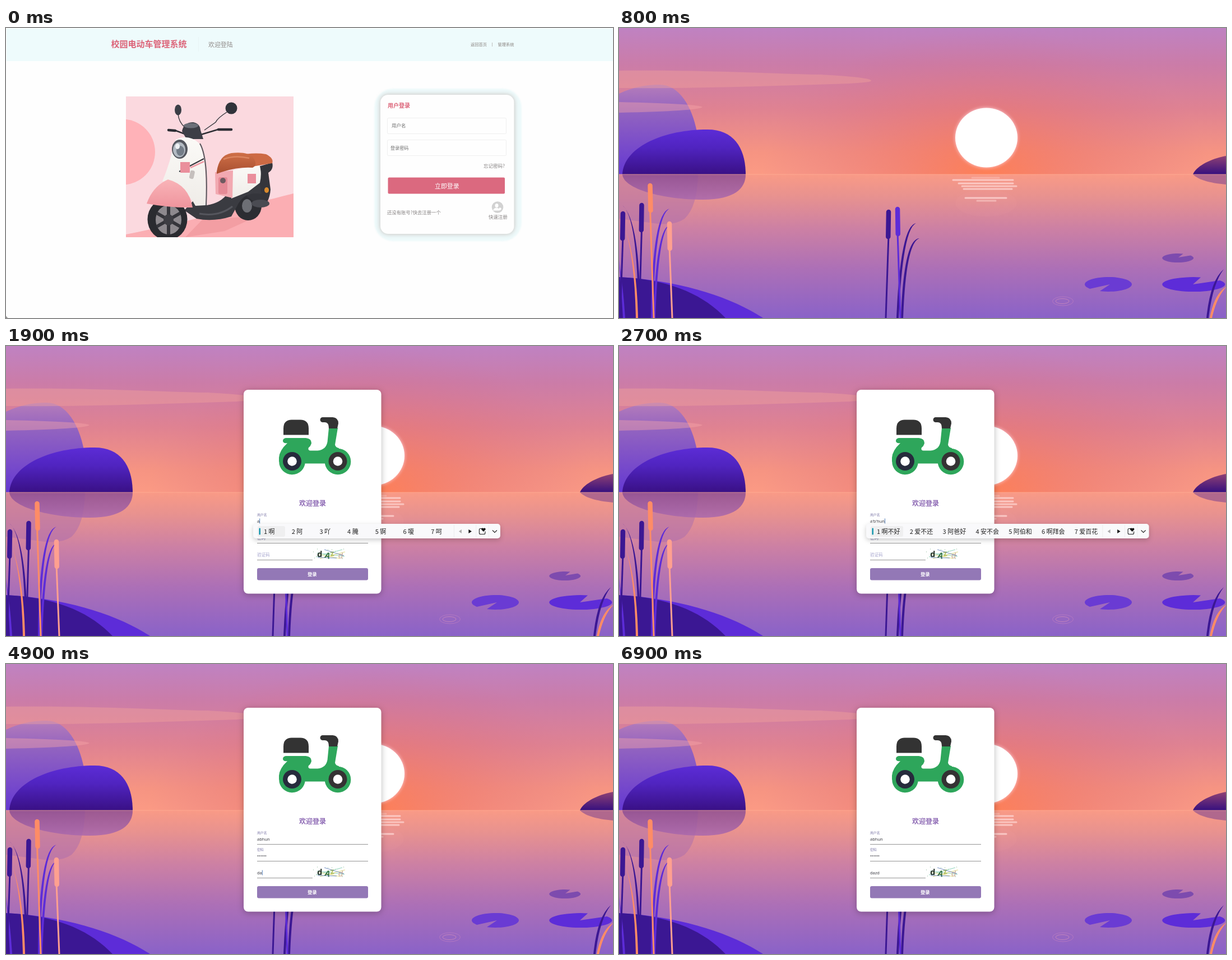
Write an HTML page that moves like this. It is 1083x517 px and loops after 8000 ms.

```html
<!DOCTYPE html>
<html lang="zh-CN">
<head>
<meta charset="utf-8">
<style>
html, body { margin: 0; width: 100%; height: 100%; overflow: hidden; background: #fefefe }
svg { display: block; width: 1083px; height: 517px; font-family: "Noto Sans CJK SC", "Noto Sans", sans-serif }
text { white-space: pre }
.value { font: 7.5px "Noto Sans", "Open Sans", sans-serif; fill: #3c3c44 }
.sun { filter: drop-shadow(0 0 3px #ffd0d8) }
.ring { filter: blur(1px) }
.soft { filter: drop-shadow(0 0 4px #9a7f7880) }
.card { filter: drop-shadow(0 2px 6px #0004) }
.panel { filter: drop-shadow(0 3px 4px #0003) }
</style>
</head>
<body>
<svg id="stage" viewBox="0 0 1083 517"></svg>
<script>
const LOOP = 8000;
const stage = document.getElementById("stage");
const $ = id => document.getElementById(id);

// Text placed by its left edge and vertical centre.
const label = (s, x, cy, size, fill, extra = "") =>
  `<text x="${x}" y="${cy + size * 0.38}" font-size="${size}" fill="${fill}" ${extra}>${s}</text>`;
const box = (x, y, w, h, fill, r = 0, extra = "") =>
  `<rect x="${x}" y="${y}" width="${w}" height="${h}" rx="${r}" fill="${fill}" ${extra}/>`;
const oval = (x, y, rx, ry, fill, extra = "") =>
  `<ellipse cx="${x}" cy="${y}" rx="${rx}" ry="${ry}" fill="${fill}" ${extra}/>`;
const shape = (d, fill, extra = "") => `<path d="${d}" fill="${fill}" ${extra}/>`;
const line = (d, color, w = 1, extra = "") =>
  `<path d="${d}" fill="none" stroke="${color}" stroke-width="${w}" ${extra}/>`;
const round = 'stroke-linecap="round"';
const bold = 'font-weight="700"';
const fade = (id, ...stops) => `<linearGradient id="${id}" x2="0" y2="1">${stops.map(([o, c]) =>
  `<stop offset="${o}" stop-color="${c}"/>`).join("")}</linearGradient>`;

const defs = `<defs>
  ${fade("sky", [0, "#bf82c2"], [.25, "#cb7ca8"], [.55, "#df8292"], [.85, "#f69482"], [1, "#fb9a84"])}
  ${fade("water", [0, "#f99a86"], [.15, "#e8928f"], [.38, "#cc80a4"], [.65, "#ad70b6"], [1, "#8a62c8"])}
  ${fade("backHill", [0, "#b57cba"], [.3, "#9263c0"], [1, "#6438d2"])}
  ${fade("frontHill", [0, "#5c2cd6"], [.4, "#5024c0"], [1, "#391085"])}
  ${fade("mirror", [0, "#8c4d92"], [1, "#a968ae"])}
  ${fade("farHill", [0, "#8f4174"], [1, "#36107e"])}
  ${fade("white", [0, "#fbfaf7"], [1, "#efece8"])}
  ${fade("seat", [0, "#cf6f47"], [1, "#a84f30"])}
  ${fade("fender", [0, "#f9b4b8"], [1, "#ef949d"])}
  <radialGradient id="glow" gradientUnits="userSpaceOnUse" cx="655" cy="262" r="400" gradientTransform="matrix(1 0 0 .65 0 92)">
    <stop stop-color="#ff7c50" stop-opacity=".9"/><stop offset=".5" stop-color="#e8706c" stop-opacity=".4"/>
    <stop offset="1" stop-color="#d06c90" stop-opacity="0"/></radialGradient>
  <clipPath id="photo">${box(214, 122, 299, 251, "#000")}</clipPath>
</defs>`;

const photo = `<g clip-path="url(#photo)">
  ${box(214, 122, 299, 251, "#fbd9df")}
  ${oval(208, 221, 58, 58.5, "#ffb2b8")}
  ${shape("M214 368C330 345 420 318 513 295V373H214Z", "#fbaeb3")}
  ${shape("M320 373L350 342L450 335L390 362Z", "#e9898f", 'opacity=".45"')}
  ${line("M307 153Q308 168 320 178M394 150Q378 160 374 168L354 182", "#33343a", 1.4)}
  ${oval(307, 146, 6, 9.5, "#3b3e46")}${oval(402, 143, 10.5, 10.5, "#30333a")}
  ${line("M303 183L322 190M348 190L378 181", "#2d2e34", 2.5)}${line("M290 182L302 183M379 181L402 181", "#2d2e34", 4.5, round)}
  ${shape("M314 184Q317 168 334 168Q346 170 347 182L352 198H322Z", "#3c3e46")}
  ${oval(330, 174, 13, 4.5, "#6b6f78")}
  ${oval(432, 317, 24, 26, "#2c2d32")}${oval(430, 317, 9, 12, "#6d6f75")}
  ${shape("M440 250L475 240Q478 252 468 258L472 288Q470 312 456 320L430 300Z", "#34353b")}
  ${oval(465, 289, 4, 5, "#d98a2c")}
  ${shape("M338 304L358 316Q384 312 396 294L452 272L456 296Q425 290 412 318L402 336Q370 346 340 340L318 325Z", "#3a3b41")}
  ${line("M345 331Q380 337 404 318", "#55565d", 3)}
  ${oval(454, 313, 16, 7, "#4a4b52")}
  ${shape("M402 254L452 243Q457 258 453 276L432 292L402 304Z", "url(#white)")}
  ${shape("M373 257L405 254L404 303L374 296Z", "#f2a9b1")}
  ${box(379, 266, 16, 30, "#e58a96", 3)}${oval(387, 272, 5, 5, "#6e5a60")}
  ${box(431, 260, 15, 17, "#ea8f9c")}
  ${shape("M412 228Q440 221 464 225Q478 232 475 241L440 247Z", "#cd6a44")}
  ${shape("M376 256Q380 227 402 223Q432 220 441 231Q450 244 440 249Q410 247 376 260Z", "url(#seat)")}
  ${line("M388 234Q408 226 434 232", "#dc855f", 2.5)}
  ${oval(288, 341, 35.5, 37, "#2a2b30")}${oval(290, 342, 23, 26, "#8d898e")}
  ${line("M290 318V368M269 330L311 354M269 354L311 330", "#35353b", 6)}${oval(290, 342, 9, 10, "#3d3d43")}
  ${shape("M303 199Q325 188 344 205Q358 225 356 316L338 317Q322 285 279 273Q291 245 297 218Z", "url(#white)")}
  ${shape("M251 313Q262 282 289 270Q326 280 333 320Q292 321 251 313Z", "url(#fender)")}
  ${line("M346 206Q361 232 357 316", "#55555b", 2)}
  ${oval(310, 216, 14, 17, "#54575f")}${oval(309, 217, 11, 13.5, "#b3bac2")}${oval(311, 219, 7, 9, "#747d88")}${oval(306, 211, 4, 5, "#eef1f4")}
  ${line("M309 256L353 233", "#34343a", 2)}${line("M329 249L353 238", "#ef9ba6", 3)}
  ${box(311, 239, 17, 19, "#ea8f9c")}${box(328, 254, 8, 15, "#c5bfbd", 3, 'transform="rotate(12 332 261)"')}
</g>`;

const portal = `<g id="portal">
  ${box(0, 0, 1083, 517, "#fefefe")}${box(1, 1, 1082, 58, "#eefbfc")}
  ${label("校园电动车管理系统", 187.5, 28.5, 15, "#dc6378", bold)}
  ${box(343, 16, 1, 26, "#e9f4f5")}
  ${label("欢迎登陆", 361, 29.5, 10.9, "#8f8a88")}
  ${label("返回首页", 829, 29.5, 7.25, "#8a8480")}${box(867, 26, .7, 7, "#a9a4a2")}
  ${label("管理系统", 877.5, 29.5, 7.25, "#8a8480")}
  ${photo}
  ${box(657, 108, 263, 272, "#eefafb", 34, 'class="ring"')}
  <g class="soft">${box(668, 119, 238.5, 248, "#fefefe", 14)}</g>
  ${label("用户登录", 681, 138.5, 10, "#dc6378", bold)}
  ${box(680.5, 160.5, 212, 28, "#fefefe", 2, 'stroke="#efefef"')}${label("用户名", 688, 174, 8.5, "#6f6f6f")}
  ${box(680.5, 199.5, 212, 28, "#fefefe", 2, 'stroke="#efefef"')}${label("登录密码", 686, 213.5, 8.1, "#6f6f6f")}
  ${label("忘记密码?", 852, 245.5, 8.5, "#858080")}
  ${box(681.5, 266.5, 208.5, 29, "#db697f", 2)}${label("立即登录", 765, 281.5, 10.9, "#fff")}
  ${label("还没有账号?快去注册一个", 680, 329, 8.35, "#858080")}
  ${oval(877, 319.5, 10.3, 10.3, "#d2d2d2")}${oval(875.5, 316.5, 3, 3.5, "#fff")}
  ${shape("M869 325.5Q870 320.5 875.5 320.5Q879 320.5 881 325.5Z", "#fff")}${oval(881.5, 322.5, 2.2, 2.2, "#fff")}
  ${label("快速注册", 861, 337, 8.45, "#858080")}
  <g id="status">${box(-1, 503, 141, 15, "#f9f9f9", 1)}</g>
  ${shape("M0 513Q1 516 4 517H0Z", "#888")}
</g>`;

const cattail = (x, y, foot, color) =>
  line(`M${x} ${y + 45}L${foot} 517`, color, 3) + line(`M${x} ${y + 4}L${x + (foot - x) * .15} ${y + 48}`, color, 8.5, round);
const blade = (tx, ty, cx, cy, foot, color) =>
  shape(`M${tx} ${ty}Q${cx} ${cy} ${foot} 517h4Q${cx + 4} ${cy + 6} ${tx} ${ty}Z`, color);
const glint = (y, x1, x2, a) => line(`M${x1} ${y}H${x2}`, "#ffd9d6", 3, `${round} opacity="${a}"`);
const night = "#3b1793", violet = "#5d2cd8", coral = "#ff8c66", peach = "#ffa090";

const lake = `<g id="lake">
  ${box(0, 0, 1083, 261, "url(#sky)")}${box(0, 0, 1083, 261, "url(#glow)")}
  ${box(0, 261, 1083, 256, "url(#water)")}
  ${shape("M0 117Q34 101 72 101C108 101 130 140 139 185L141 261H0Z", "url(#backHill)")}
  ${shape("M0 261H141Q140 318 117 340Q100 352 70 349L0 340Z", "#a568b0", 'opacity=".45"')}
  ${shape("M0 76C150 74 280 82 360 83Q450 88 450 94Q450 98 380 100C250 104 120 108 0 107Z", "#f5a79a", 'opacity=".38"')}
  ${shape("M0 132Q140 135 149 141Q140 148 0 151Z", "#f5a5a8", 'opacity=".42"')}
  ${shape("M6 261C8 213 78 181 158 181C206 181 226 216 226 261Z", "url(#frontHill)")}
  ${shape("M6 261C8 287 78 306 150 306C206 306 226 286 226 261Z", "url(#mirror)", 'opacity=".85"')}
  ${shape("M1024 261C1030 245 1060 232 1083 228V261Z", "url(#farHill)")}
  ${shape("M1024 261C1035 272 1060 277 1083 279V261Z", "#a5608f", 'opacity=".85"')}
  ${box(0, 260.5, 1083, 1, "#ffb297", 0, 'opacity=".7"')}
  ${oval(655.5, 195.5, 55.5, 53, "#fff", 'class="sun"')}
  ${oval(655, 312, 55, 24, "#fbaea0", 'opacity=".06"')}
  ${glint(267, 630, 678, .3)}${glint(271, 596, 703, .75)}${glint(277, 606, 703, .75)}${glint(282, 612, 709, .7)}
  ${glint(287, 615, 701, .75)}${glint(303, 618, 691, .75)}${glint(308, 639, 672, .5)}
  ${shape("M1020 405.4A28 8 0 1 1 1006.6 402.5L998 409Z", "#7d4bae")}
  ${shape("M840 465A42 13 0 1 1 858 469.1L876 457Z", "#6a3bd3")}
  ${shape("M1072 449.9A56 13 0 1 1 1038 444.4L1024 457Z", violet)}
  ${oval(792, 487, 18.5, 8, "none", 'stroke="#b97cc2" stroke-width=".8"')}${oval(791, 487, 12, 4.5, "none", 'stroke="#cf8cbc" stroke-width=".8"')}
  ${shape("M0 444C110 450 200 480 257 517H0Z", violet)}${shape("M0 444C90 448 150 475 190 517H0Z", night)}
  ${blade(6, 316, 34, 338, 34, night)}${blade(90, 322, 59, 330, 57, violet)}${blade(89, 352, 66, 362, 61, violet)}
  ${blade(12, 360, 28, 415, 30, coral)}${blade(0, 414, 4, 460, 7, violet)}
  ${cattail(7, 327, 2, night)}${cattail(40.5, 312, 36, night)}${cattail(55.5, 277, 62, coral)}${cattail(90, 345, 95, peach)}
  ${blade(530, 348, 502, 352, 495, night)}${blade(536, 375, 508, 376, 503, night)}
  ${cattail(481, 324, 476, night)}${cattail(497, 319, 502, violet)}
  ${blade(1079, 430, 1055, 450, 1048, night)}${blade(1084, 461, 1062, 474, 1054, coral)}
</g>`;

const scooter = `
  ${shape("M495 158.5V147Q495 131.5 510 131.5H525Q540 131.5 540 147V158.5Z", "#333")}
  ${shape("M499 164H535Q545 165 545 173Q544 178 540 181Q538 186 543 186.5H556Q571 185 573.5 171L576 146H592L587 176Q588 181 594 182L592 209.5H510L487 206V199Q488 186 502 173Q494 174 494 169Q494 165 499 164Z", "#2ea65b")}
  ${oval(510.5, 206, 23.3, 23.3, "#2ea65b")}${oval(592, 206, 23.3, 23.3, "#2ea65b")}
  ${oval(510.5, 205.5, 16.5, 16.5, "#262b3c")}${oval(592, 205.5, 16.5, 16.5, "#343233")}
  ${oval(510.5, 205.5, 8.3, 8.3, "#fff")}${oval(592, 205.5, 8.3, 8.3, "#fff")}
  ${shape("M565 127H583Q593 128 593 138L591 147H576Q576 136 569 136H565A4.5 4.5 0 0 1 565 127Z", "#333")}`;

const tilted = (c, x, y, angle, color) =>
  `<text transform="translate(${x} ${y}) rotate(${angle})" font-size="14" ${bold} fill="${color}">${c}</text>`;
const captcha = `<g id="captcha">
  ${line("M555 369L604 375M553 376L600 363", "#5fc0a0", .7)}${line("M560 379L605 367M558 371L596 379", "#d8cf4e", .7)}
  ${tilted("d", 555, 376, 2, "#1d2a22")}${tilted("A", 568, 377, 18, "#2d6b3c")}
  ${tilted("z", 579, 375, -8, "#b8c05a")}${tilted("d", 592, 378, 8, "#d9c3ad")}
  ${line("M568 363L603 374M556 377L590 378", "#3560a8", .7)}
  ${line("M548 367h1m6 -5h1m18 1h1m12 3h1m14 -4h1M550 378h1m30 -15h1m18 16h1", "#7db08a", 1)}
</g>`;

const rows = [312, 342, 372];
const names = ["用户名", "密码", "验证码"];
const login = `<g id="login">
  <g class="card">${box(424, 78, 245.5, 363.5, "#fff", 8)}</g>
  ${scooter}
  ${label("欢迎登录", 523, 280, 12, "#8d69b4", bold)}
  ${rows.map((y, i) => `${box(448, y + 9, i < 2 ? 198 : 99, 1, "#959595")}
    <g id="name${i}">${label(names[i], 0, 0, 7.5, i < 2 ? "#7d78a8" : "#a3a2cc")}</g>
    <text id="value${i}" class="value" x="448" y="${y + 2.6}"></text>`).join("")}
  ${captcha}
  ${box(448, 396, 198, 21.5, "#9378b6", 3)}${label("登录", 538, 407, 8.4, "#fff", bold)}
  <rect id="caret" width=".9" height="9" fill="#3f6fb0"/>
</g>`;

const ime = `<g id="ime">
  <rect id="back" class="panel" height="26" rx="5" fill="#f9f9fb"/>
  <rect id="pick" x="8" y="4" height="19" rx="3" fill="#efeff0"/>
  ${box(10.5, 7.5, 2.4, 12, "#0e93ab", 1.2)}
  <g id="words"></g>
  <g id="tools">${box(-83, 2, .7, 22, "#e6e6e6")}${box(-43.5, 2, .7, 22, "#ebebeb")}${box(-21, 2, .7, 22, "#ebebeb")}
    ${shape("M-69 10v7l-5 -3.5Z", "#aaa")}${shape("M-56.5 10v7l5.5 -3.5Z", "#111")}
    ${line("M-31 8.5h-4.5q-2 0 -2 2v6q0 2 2 2h6.5q2 0 2 -2v-3", "#222", 1.1)}
    ${shape("M-30 14l-3.5 -3.5a2 2 0 0 1 3.5 -2a2 2 0 0 1 3.5 2Z", "#111")}
    ${line("M-14 11.5l4 4l4 -4", "#222", 1.1)}</g>
</g>`;

stage.innerHTML = defs + portal + lake + login + ime;

// Each keystroke: time, field, committed text, text being composed, candidates.
const three = "啊不好 爱不还 阿爸好 安不会 阿伯和 啊拜会 爱百花";
const keys = [
  [1900, 0, "", "a", "啊 阿 吖 腌 锕 嗄 呵"],
  [2200, 0, "", "a'b", "阿爸 阿伯 啊吧 啊不 挨班 安步 暗部"],
  [2400, 0, "", "a'b'h", three],
  [2600, 0, "", "a'b'hu", three],
  [2700, 0, "", "a'b'hun", three],
  [2900, 0, "abhun", ""],
  [3200, 1, "••", ""], [3300, 1, "•••", ""], [3400, 1, "•••••", ""], [3500, 1, "••••••", ""],
  [4300, 2, "", "d", "的 大 到 地 都 对 多"],
  [4700, 2, "", "da", "大 打 达 答 搭 瘩 哒"],
  [4900, 2, "da", ""],
  [5000, 2, "da", "z", "在 这 中 种 着 再 做"],
  [5050, 2, "daz", ""],
  [5700, 2, "daz", "d", "的 大 到 地 都 对 多"],
  [5800, 2, "dazd", ""]
];
const focus = [[1400, 0], [2900, 1], [3800, 2], [6900, -1]];

const show = (id, on) => $(id).style.display = on ? "" : "none";
const clamp = v => Math.max(0, Math.min(1, v));
const lastBefore = (list, t) => list.filter(e => e[0] <= t).pop();

function drawIme([, field, done, , list]) {
  const words = list.split(" ");
  const slot = words[0].length > 2 ? 58.8 : 49.7;
  const width = 93 + slot * 7;
  $("value" + field).textContent = done;
  const start = 448 + (done ? $("value" + field).getComputedTextLength() : 0);
  $("ime").setAttribute("transform", `translate(${start - 7} ${rows[field] + 5})`);
  $("back").setAttribute("width", width);
  $("pick").setAttribute("width", slot - .7);
  $("tools").setAttribute("transform", `translate(${width} 0)`);
  $("words").innerHTML = words.map((w, i) => label(`${i + 1} ${w}`, 19 + i * slot, 14, 11, "#222")).join("");
}

function draw(now) {
  const t = Math.floor(now % LOOP / 100) * 100; // the screen refreshes ten times a second
  show("portal", t < 800);
  show("status", t >= 600);
  $("status").setAttribute("opacity", t < 700 ? .5 : 1);
  show("lake", t >= 800);
  show("login", t >= 900);
  show("captcha", t >= 1100);

  const key = lastBefore(keys, t);
  const composing = key && key[3] !== "";
  show("ime", composing);
  if (composing) drawIme(key);

  rows.forEach((y, i) => {
    const k = lastBefore(keys.filter(e => e[1] === i), t);
    const text = k ? k[2] + k[3] : "";
    $("value" + i).textContent = text;
    const p = i < 2 ? clamp((t - focus[i][0] + 100) / 400) : 0;
    const lift = p * (2 - p);
    $("name" + i).setAttribute("transform", `translate(448 ${y - 11 * lift}) scale(${1 - .22 * lift})`);
    show("name" + i, i < 2 || !text);
  });

  const f = lastBefore(focus, t);
  const active = f && f[1] >= 0;
  const since = t - Math.max(f ? f[0] : 0, key ? key[0] : 0);
  show("caret", active && Math.floor(since / 450) % 2 === 0);
  if (active) {
    const value = $("value" + f[1]);
    $("caret").setAttribute("x", 448 + (value.textContent ? value.getComputedTextLength() : 0));
    $("caret").setAttribute("y", rows[f[1]] - 4.5);
  }
  requestAnimationFrame(() => draw(performance.now()));
}
draw(performance.now());
</script>
</body>
</html>
```
